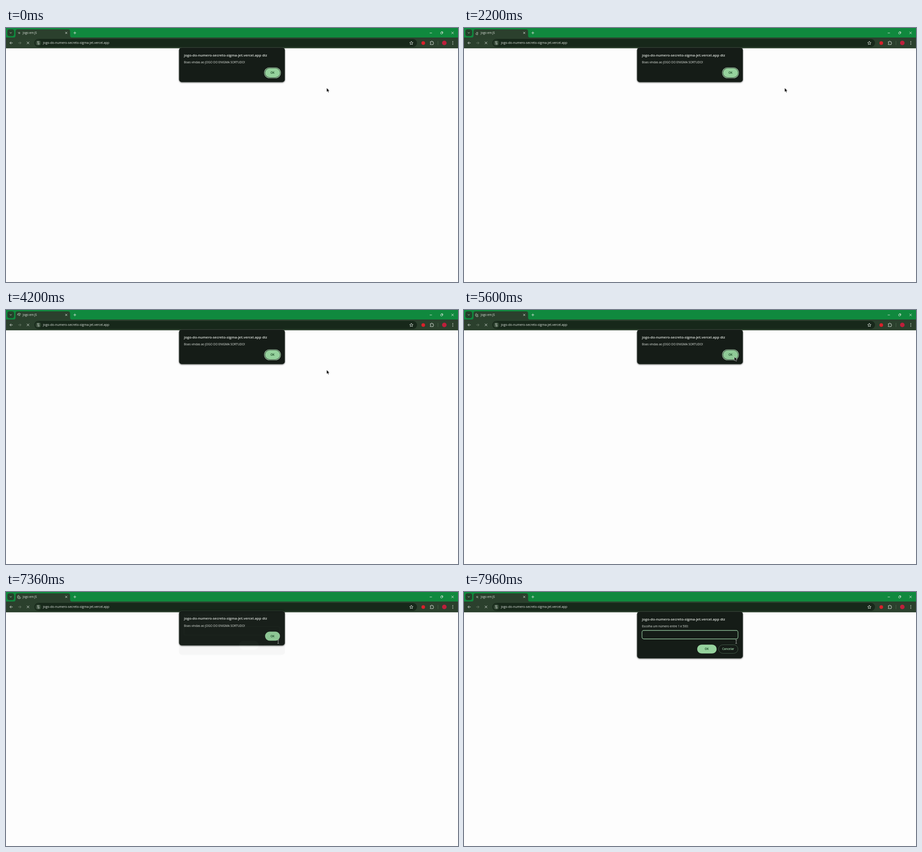
These frames come from a looping animation (998 by 561 pixels, 8000 ms). An HTML page:

```html
<!DOCTYPE html>
<html lang="pt-BR">
<head>
<meta charset="utf-8">
<title>Jogo em JS</title>
<style>
  html, body { margin: 0; width: 100%; height: 100%; overflow: hidden; background: #fdfdfd; }
  svg { display: block; width: 100%; height: 100%; }
  text { font-family: "Open Sans", "Noto Sans", sans-serif; font-size: 6.45px; fill: #e4e9e3; }
  .line { fill: none; stroke: #e3e9e2; stroke-width: .9; }
  .dim { stroke: #71806f; }
  .heading { font-size: 7.9px; font-weight: 600; }
  .label { font-size: 6.3px; font-weight: 600; text-anchor: middle; fill: #12421f; }
  .panel { fill: #151c17; stroke: #47524a; stroke-width: .6; filter: drop-shadow(0 1px 1.5px #0008); }
  .button { fill: #96d29d; }
</style>
</head>
<body>
<svg viewBox="0 0 998 561" preserveAspectRatio="none">
  <rect width="998" height="561" fill="#fdfdfd"/>

  <!-- Tab strip -->
  <rect width="998" height="22" fill="#10893e"/>
  <rect x="3" y="3" width="15" height="15" rx="4.5" fill="#24412a"/>
  <path class="line" d="M8.5 9.7l2 2 2-2"/>
  <path d="M17 21q4 0 4-4V7.500q0-4.500 4.500-4.500H137q4.500 0 4.500 4.500V17q0 4 4 4z" fill="#2b402d"/>
  <text x="37" y="13.200" style="font-size:6.4px">Jogo em JS</text>
  <path class="line" d="M130.800 8.600l4.400 4.400m0-4.400l-4.400 4.400M149 10.800h6m-3-3v6"/>
  <path class="line" d="M935.500 11h5M983.500 8.300l5 5m0-5l-5 5"/>
  <rect class="line" x="959.700" y="9.300" width="3.800" height="3.800" rx=".8"/>
  <path class="line" d="M961 8.200h2.600q1 0 1 1v2.600" stroke-width=".6"/>

  <!-- Throbber -->
  <circle cx="29.200" cy="11" r="1.700" class="line" style="stroke:#a9b8a9;stroke-width:.8"/>
  <path d="M28 9.800l2.300 2.300" class="line" style="stroke:#a9b8a9;stroke-width:.8"/>
  <path id="throbber" class="line" style="stroke:#c9d3c8;stroke-width:1"/>

  <!-- Toolbar -->
  <rect y="21" width="998" height="24" fill="#2b402d"/>
  <rect y="44" width="998" height="1" fill="#4a5b4b"/>
  <path class="line" d="M14.800 33H8.500m2.900-2.900L8.500 33l2.900 2.900"/>
  <path class="line dim" d="M27 33h6.300m-2.900-2.900l2.900 2.900-2.900 2.900"/>
  <path class="line" d="M46 30.300l5.200 5.200m0-5.200l-5.200 5.200"/>
  <rect x="62.500" y="24" width="845" height="18" rx="9" fill="#17281a"/>
  <circle cx="71.200" cy="33" r="6.700" fill="#2b402d"/>
  <path class="line" d="M68 31h1.500m2.800 0h2.400M68 35h2.300m2.900 0h1.500"/>
  <circle class="line" cx="70.800" cy="31" r="1.100"/>
  <circle class="line" cx="72" cy="35" r="1.100"/>
  <text x="81.500" y="35.300" style="font-size:7px">jogo-do-numero-secreto-sigma-jet.vercel.app</text>
  <path class="line" stroke-linejoin="round" d="M895 29.300l1.100 2.500 2.700.3-2 1.800.6 2.700-2.400-1.400-2.400 1.400.6-2.700-2-1.800 2.700-.3z"/>
  <circle cx="921.300" cy="33.200" r="4" fill="#d9202b"/>
  <path class="line" d="M936.800 30.300h2.200q0-1.500 1.100-1.500t1.100 1.500h2v2.200q1.300 0 1.300 1t-1.300 1v2.200h-6.400v-2.100q1.400 0 1.400-1.100t-1.400-1.100z"/>
  <path d="M953.800 28.500v9" stroke="#4d6850" stroke-width=".9"/>
  <circle cx="967.800" cy="33" r="5" fill="#bd1f3b"/>
  <g fill="#e3e9e2">
    <circle cx="986.500" cy="29.900" r=".85"/><circle cx="986.500" cy="33" r=".85"/><circle cx="986.500" cy="36.100" r=".85"/>
  </g>

  <g id="alert">
    <rect class="panel" x="382.200" y="43.200" width="233.500" height="76.200" rx="6"/>
    <text class="heading" x="393" y="62.700">jogo-do-numero-secreto-sigma-jet.vercel.app diz</text>
    <text x="393" y="78">Boas vindas ao JOGO DO ENIGMA SORTUDO!</text>
    <rect id="ring" x="570.600" y="87.700" width="35.600" height="22.600" rx="11.300" fill="none" stroke="#b5e2ba" stroke-width="1.100"/>
    <rect id="ok" class="button" x="572" y="89.100" width="33" height="19.800" rx="9.900"/>
    <text class="label" x="588.400" y="101.300">OK</text>
  </g>

  <g id="prompt">
    <rect class="panel" x="382.200" y="43.200" width="233.500" height="103.400" rx="6"/>
    <text class="heading" x="393" y="62.700">jogo-do-numero-secreto-sigma-jet.vercel.app diz</text>
    <text x="393" y="78">Escolha um número entre 1 e 500:</text>
    <rect x="393" y="84.900" width="212" height="18.700" rx="4" fill="#151c17" stroke="#a4dcaf" stroke-width="1.100"/>
    <rect class="button" x="514.800" y="116.200" width="43" height="19.600" rx="9.800"/>
    <text class="label" x="535.900" y="128.300">OK</text>
    <rect x="562.200" y="116.500" width="42.700" height="19" rx="9.500" fill="none" stroke="#4d6853" stroke-width=".8"/>
    <text class="label" x="583.300" y="128.300" style="fill:#a4dcaf">Cancelar</text>
  </g>

  <path id="arrow" d="M0 0v8.700l2-1.900 1.400 3.100 1.500-.7-1.400-3h2.800z" fill="#050505" stroke="#fff" stroke-width=".5"/>
  <path id="beam" d="M-1.800-4q1.800 0 1.800 1v6q0 1-1.800 1M1.800-4Q0-4 0-3M0 3q0 1 1.800 1" fill="none" stroke="#b9bdb9" stroke-width=".9"/>
</svg>
<script>
const LOOP = 8000;
const $ = id => document.getElementById(id);
const progress = (t, from, to) => Math.min(1, Math.max(0, (t - from) / (to - from)));
const smooth = p => p * p * (3 - 2 * p);
const mix = (a, b, p) => a + (b - a) * p;
const show = (id, on) => $(id).style.display = on ? "" : "none";
const move = (id, x, y) => $(id).setAttribute("transform", `translate(${x} ${y})`);

// Material curve cubic-bezier(.4, 0, .2, 1), solved by bisection.
function fastOutSlowIn(x) {
  let low = 0, high = 1, u = .5;
  for (let i = 0; i < 18; i++) {
    u = (low + high) / 2;
    const at = 1.2 * u * (1 - u) ** 2 + .6 * u * u * (1 - u) + u ** 3;
    if (at < x) low = u; else high = u;
  }
  return u * u * (3 - 2 * u);
}

// The arc grows to 270 degrees and shrinks again while it turns.
function throbberPath(t) {
  const sweepTime = 666, turnTime = 1568, span = 270;
  const clock = t + 66;
  const step = Math.floor(clock / sweepTime);
  const eased = span * fastOutSlowIn(clock % sweepTime / sweepTime);
  const base = 196.5 + 360 * t / turnTime + span * Math.floor(step / 2);
  let from = base, to = base + eased;
  if (step % 2) [from, to] = [base + eased, base + span];
  to = Math.max(to, from + 8);
  const point = deg => {
    const a = deg * Math.PI / 180;
    return `${29 + 3.8 * Math.cos(a)} ${11 + 3.8 * Math.sin(a)}`;
  };
  return `M${point(from)}A3.8 3.8 0 ${to - from > 180 ? 1 : 0} 1 ${point(to)}`;
}

function draw(t) {
  $("throbber").setAttribute("d", throbberPath(t));

  const toButton = smooth(progress(t, 4300, 4950));
  const settle = smooth(progress(t, 6950, 7250));
  move("arrow", mix(mix(708, 597, toButton), 601, settle), mix(mix(132.5, 103.5, toButton), 109, settle));
  move("beam", 601, 109.8);
  show("arrow", t < 7350);
  show("beam", t >= 7350);
  $("ok").style.fill = t > 4850 ? "#8fca97" : "";

  const leave = progress(t, 7320, 7470);
  show("alert", leave < 1);
  show("ring", t < 7330);
  move("alert", 0, -20 * leave ** 2);
  $("alert").style.opacity = 1 - leave ** 3;

  const enter = progress(t, 7355, 7495);
  show("prompt", enter > 0);
  move("prompt", 0, -8.4 * (1 - smooth(enter)));
  $("prompt").style.opacity = enter < 1 ? smooth(enter) + .02 * (1 - enter) : 1;
}

const began = performance.now();
function tick() {
  draw((performance.now() - began) % LOOP);
  requestAnimationFrame(tick);
}
tick();
</script>
</body>
</html>
```
